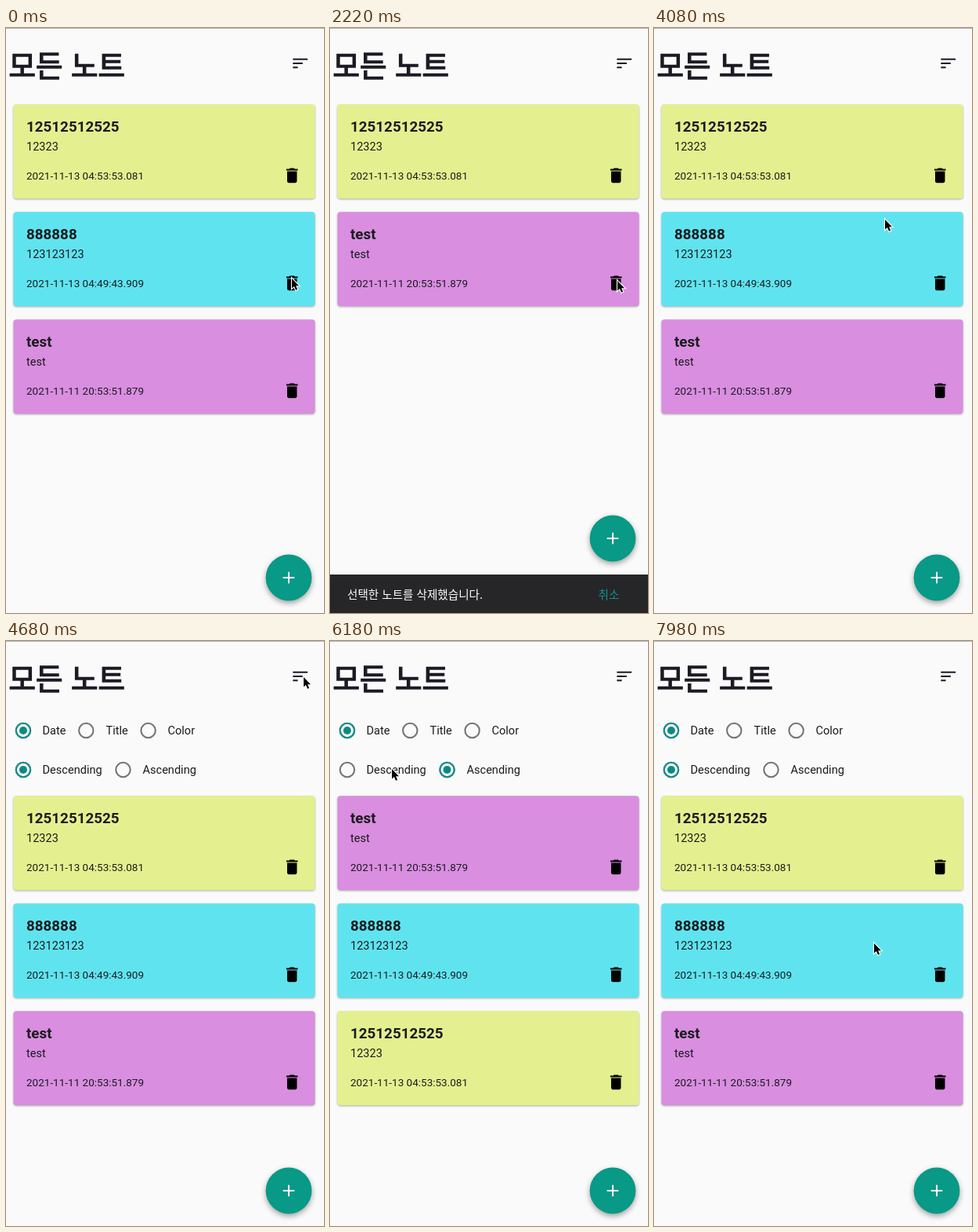
Recreate the animation shown at these times as an HTML page. Size 406 by 745 pixels, loop 8000 ms.

```html
<!DOCTYPE html>
<html lang="ko">
<head>
<meta charset="utf-8">
<style>
  html, body { margin: 0; width: 100%; height: 100%; overflow: hidden; background: #fafafa; }
  svg { display: block; width: 100vw; height: 100vh; }
  text { font: 14.57px Roboto, "Noto Sans CJK KR", "Noto Sans CJK", sans-serif; fill: #1b1b1f; white-space: pre; }
  text.korean { font-family: "Noto Sans CJK KR", "Noto Sans CJK", sans-serif; }
  .page-title { font-size: 37.5px; fill: #1c1b24; stroke: #1c1b24; stroke-width: 1.4; }
  .name { font-size: 18.8px; font-weight: 700; }
  .date { font-size: 13.53px; }
  .card rect { filter: drop-shadow(0 1px 1.2px rgba(0, 0, 0, .32)); }
  #fab circle { filter: drop-shadow(0 3px 3.5px rgba(0, 0, 0, .36)); }
</style>
</head>
<body>
<svg id="stage" viewBox="0 0 406 745" lang="ko"></svg>
<script>
const LOOP = 8000, UNIT = 1.041, CARD_TOP = 97, CARD_PITCH = 137;
const TEAL = '#089987';

// Moments at which the user acts
const DELETE = 1800, BAR_IN = 1850, UNDO = 3190, BAR_OUT = 3240;
const OPEN = 4370, ASCEND = 5400, DESCEND = 6420;

const notes = [
  { name: '12512512525', body: '12323', date: '2021-11-13 04:53:53.081', color: '#e4f08f' },
  { name: '888888', body: '123123123', date: '2021-11-13 04:49:43.909', color: '#5fe4ef' },
  { name: 'test', body: 'test', date: '2021-11-11 20:53:51.879', color: '#d98ee0' }
];

// Pointer stops: time, x, y
const pointerPath = [
  [0, 365, 319], [1400, 365, 319], [1700, 367, 322], [2400, 367, 322],
  [3000, 345, 718], [3400, 345, 718], [4030, 295, 244], [4090, 295, 244],
  [4330, 380, 46], [4780, 380, 46], [5250, 152, 163], [5650, 152, 163],
  [6100, 79, 163], [6750, 79, 163], [7500, 281, 385], [LOOP, 281, 385]
];

const card = ({ name, body, date, color }) => `
  <g class="card">
    <rect x="9.5" y=".3" width="385" height="120" rx="4" fill="${color}"/>
    <text class="name" x="26" y="34.7">${name}</text>
    <text x="26" y="58.7">${body}</text>
    <text class="date" x="26" y="95.8">${date}</text>
    <path transform="translate(352.7 78.3) scale(${UNIT})" fill="#000"
      d="M6 19c0 1.1.9 2 2 2h8c1.1 0 2-.9 2-2V7H6zM19 4h-3.5l-1-1h-5l-1 1H5v2h14z"/>
  </g>`;

const radio = (id, x, y, label, labelX) => `
  <g id="${id}" fill="none" stroke-width="2.1">
    <circle cx="${x}" cy="${y}" r="9.2" stroke="#757575"/>
    <g class="on">
      <circle cx="${x}" cy="${y}" r="9.2" stroke="#0b9186"/>
      <circle class="dot" cx="${x}" cy="${y}" r="5" fill="#0b8985"/>
    </g>
    <text x="${labelX}" y="${y + 5.2}">${label}</text>
  </g>`;

document.getElementById('stage').innerHTML = `
  <rect width="406" height="745" fill="#fafafa"/>
  <rect width="406" height="1" fill="#b2b2b2"/>
  <text class="korean page-title" x="3.5" y="61.6">모든 노트</text>
  <circle id="ripple" cx="376" cy="45" r="36"/>
  <path transform="translate(363.2 32.5) scale(${UNIT})" fill="#1b1b26"
    d="M3 18h6v-2H3zM3 6v2h18V6zm0 7h12v-2H3z"/>
  <g id="filters">
    ${radio('byDate', 22, 114, 'Date', 46.5)}
    ${radio('byTitle', 102.3, 114, 'Title', 127.5)}
    ${radio('byColor', 181.6, 114, 'Color', 206.5)}
    ${radio('descending', 22, 164, 'Descending', 46.5)}
    ${radio('ascending', 149.5, 164, 'Ascending', 174.5)}
  </g>
  ${notes.map(card).join('')}
  <g id="fab">
    <circle cx="361" cy="700" r="29.4" fill="${TEAL}"/>
    <path d="M353.7 700h14.6M361 692.7v14.6" stroke="#fff" stroke-width="2"/>
  </g>
  <g id="bar">
    <rect y="746" width="406" height="50" fill="#262629"/>
    <g id="barContent">
      <rect id="pressed" x="325" y="753" width="53" height="38" rx="12" fill="#fff"/>
      <text class="korean" x="22" y="777" style="fill:#fff">선택한 노트를 삭제했습니다.</text>
      <text class="korean" x="342.5" y="777" style="fill:#0b9389">취소</text>
    </g>
  </g>
  <path id="pointer" d="M0 0V12.6L2.9 10 5 14.8 7.1 13.9 5.1 9.2H9Z"
    fill="#000" stroke="#fff" stroke-width="2.2" paint-order="stroke"/>`;

const el = id => document.getElementById(id);
const cards = [...document.querySelectorAll('.card')];
const clamp = v => Math.min(1, Math.max(0, v));
const ramp = (t, start, length) => clamp((t - start) / length);
const smooth = p => p * p * (3 - 2 * p);
const move = (node, x, y) => node.setAttribute('transform', `translate(${x} ${y})`);

// cubic-bezier(.4, 0, .2, 1)
function fastOutSlowIn(p) {
  let low = 0, high = 1;
  for (let i = 0; i < 20; i++) {
    const u = (low + high) / 2, v = 1 - u;
    if (1.2 * u * v * v + .6 * u * u * v + u * u * u < p) low = u; else high = u;
  }
  return smooth(high);
}

function setRadio(id, amount) {
  const on = el(id).querySelector('.on');
  on.setAttribute('opacity', amount);
  on.querySelector('.dot').setAttribute('r', 5 * amount);
}

function pointerAt(t) {
  const next = Math.max(1, pointerPath.findIndex(stop => stop[0] > t));
  const [t0, x0, y0] = pointerPath[next - 1], [t1, x1, y1] = pointerPath[next];
  const p = smooth(ramp(t, t0, t1 - t0));
  return [x0 + (x1 - x0) * p, y0 + (y1 - y0) * p];
}

function render(t) {
  const deleted = t >= DELETE && t < UNDO;
  const opened = t >= OPEN;
  const order = deleted ? [0, 2] : [0, 1, 2];
  if (t >= ASCEND && t < DESCEND) order.reverse();
  cards.forEach((node, i) => {
    const slot = order.indexOf(i);
    node.setAttribute('visibility', slot < 0 ? 'hidden' : 'visible');
    move(node, 0, CARD_TOP + slot * CARD_PITCH + (opened ? 100 : 0));
  });

  el('filters').setAttribute('opacity', ramp(t, OPEN, 250));
  const rising = ramp(t, ASCEND, 150) - ramp(t, DESCEND, 150);
  setRadio('byDate', 1);
  setRadio('byTitle', 0);
  setRadio('byColor', 0);
  setRadio('ascending', rising);
  setRadio('descending', 1 - rising);
  el('ripple').setAttribute('opacity', .09 * (ramp(t, 4320, 80) - ramp(t, 4430, 220)));

  const shown = ramp(t, BAR_IN, 250) - ramp(t, BAR_OUT, 250);
  const lift = -50 * fastOutSlowIn(shown);
  move(el('fab'), 0, lift);
  move(el('bar'), 0, lift);
  el('barContent').setAttribute('opacity', ramp(shown, .4, .35));
  el('pressed').setAttribute('opacity', .03 * ramp(t, 3080, 100));

  move(el('pointer'), ...pointerAt(t));
}

function frame() {
  render(performance.now() % LOOP);
  requestAnimationFrame(frame);
}
frame();
</script>
</body>
</html>
```
